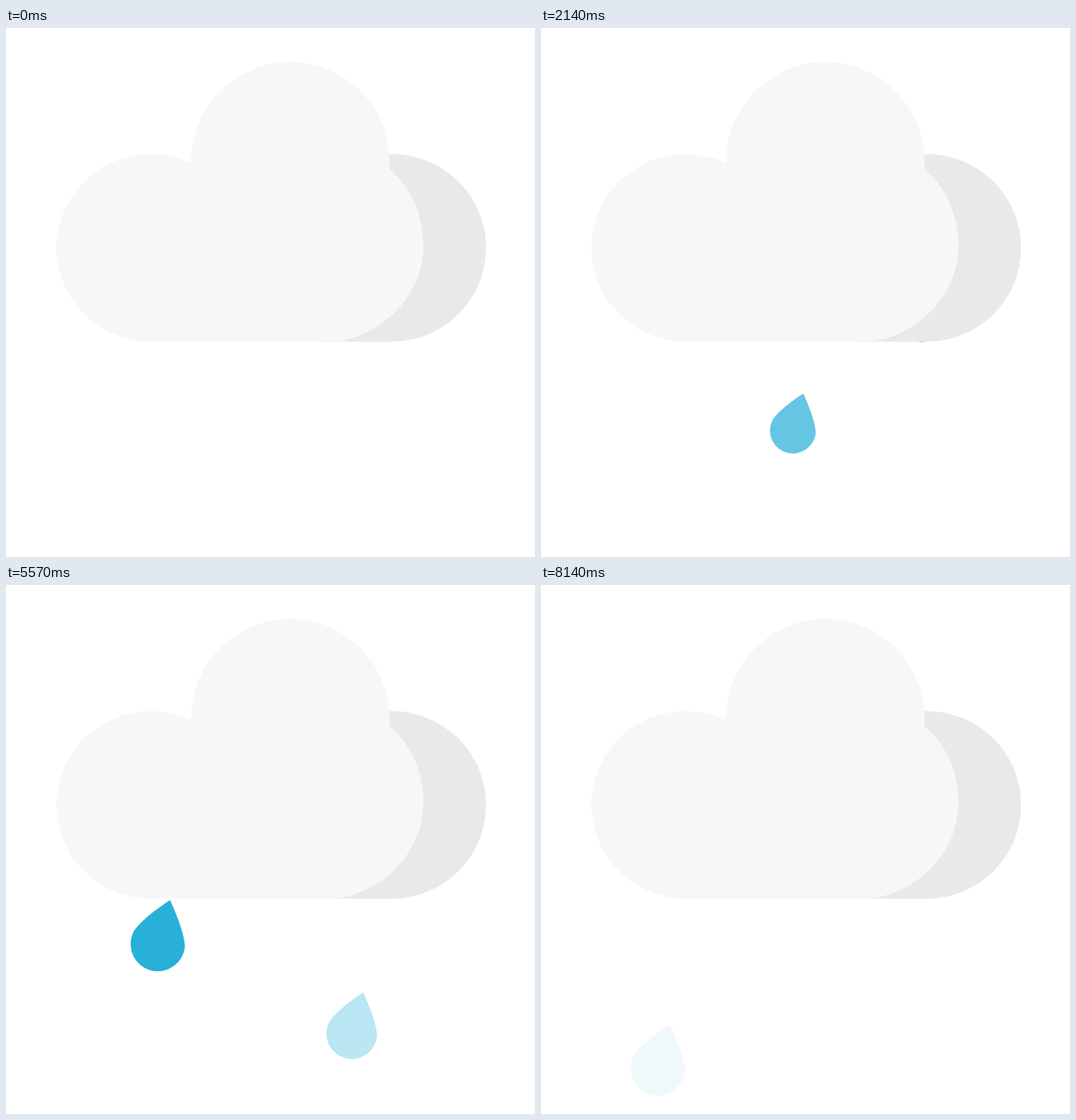
An HTML page for the animation above (8.43 s loop, 640 by 640 pixels).

```html
<!DOCTYPE html>
<html lang="en">
<head>
<meta charset="utf-8">
<title>Rain cloud</title>
<style>
  html, body { margin: 0; width: 100%; height: 100%; overflow: hidden; background: #fff; }
  svg { display: block; width: 100vw; height: 100vh; }
</style>
</head>
<body>
<svg viewBox="0 0 640 640">
  <g id="rain" fill="#29b0d8"></g>
  <path fill="#e9e9e9" d="M380 152.5H467A113.8 113.5 0 0 1 467 379.5H380Z"/>
  <g fill="#f7f7f7">
    <ellipse cx="175" cy="266" rx="114" ry="113.5"/>
    <circle cx="344" cy="161" r="120"/>
    <path d="M175 379.5V266L224 161H464V171C490 192 505 227 505 263C505 325 454 373 398 379.5Z"/>
  </g>
</svg>
<script>
  const LOOP = 8430;
  const FPS = 14;
  const LAST_STEP = 114;
  const DROP_PATH = "M0 0C-12 7.5 -34 24 -38.1 34A27.8 27.8 0 1 0 15.2 47C14.5 33 5 11 0 0Z";

  // Each drop's tip is at (x, y) at time `at`; speeds are in px per ms.
  const drops = [
    { at: 1430, x: 324.5, y: 404, vx: -0.0101, vy: 0.0537, size: 1, fade: [1350, 4165], from: 70 },
    { at: 3570, x: 457.2, y: 380, vx: -0.0125, vy: 0.0565, size: 1.107, fade: [3500, 6535], from: 2000 },
    { at: 5570, x: 198.5, y: 381.2, vx: -0.0165, vy: 0.0586, size: 1.185, fade: [5560, 8350], from: 3900 }
  ];

  const rain = document.getElementById("rain");
  for (const drop of drops) {
    drop.node = document.createElementNS("http://www.w3.org/2000/svg", "path");
    drop.node.setAttribute("d", DROP_PATH);
    rain.append(drop.node);
  }

  const clamp01 = v => Math.min(1, Math.max(0, v));

  // The motion advances in even steps and rests on the last one.
  function stepTime(ms) {
    const step = Math.floor((ms % LOOP + 5) * FPS / 1000);
    return Math.round(Math.min(step, LAST_STEP) * 100 / FPS) * 10;
  }

  function render(ms) {
    const t = stepTime(ms);
    for (const { node, at, x, y, vx, vy, size, fade, from } of drops) {
      const dt = t - at;
      const alpha = t < from ? 0 : clamp01((fade[1] - t) / (fade[1] - fade[0]));
      node.setAttribute("transform", `translate(${x + vx * dt} ${y + vy * dt}) scale(${size})`);
      node.setAttribute("opacity", alpha);
    }
  }

  const start = performance.now();
  function tick() {
    render(performance.now() - start);
    requestAnimationFrame(tick);
  }
  tick();
</script>
</body>
</html>
```
